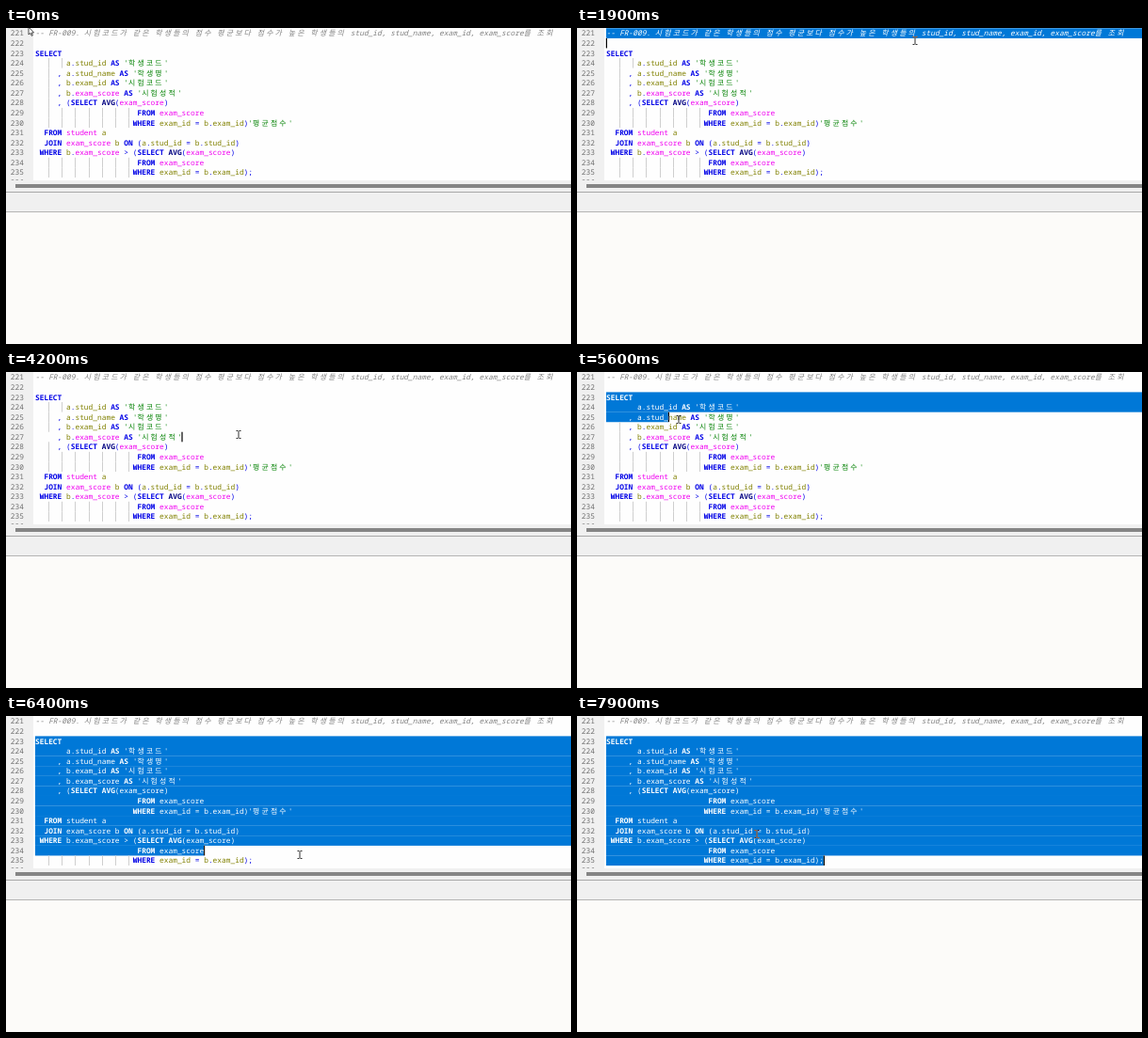
Recreate the animation shown at these times as an HTML page with a canvas. Size 600 by 336 pixels, loop 8 s.

```html
<!DOCTYPE html>
<html lang="ko">
<head>
<meta charset="utf-8">
<title>SQL editor</title>
<style>
html, body { margin: 0; width: 100%; height: 100%; overflow: hidden; background: #fcfbf9; }
canvas { display: block; }
</style>
</head>
<body>
<canvas id="stage" width="600" height="336"></canvas>
<script>
const LOOP = 8000, LEFT = 31, TOP = 0.25, CHAR = 4.715, ROW = 10.58, FIRST = 221;
const BLUE = '#0078d7', FAMILY = '7.86px "Noto Sans Mono", "Noto Sans CJK KR", "Noto Sans CJK", monospace';
const ctx = document.getElementById('stage').getContext('2d');

const lines = [
  '-- FR-009. 시험코드가 같은 학생들의 점수 평균보다 점수가 높은 학생들의 stud_id, stud_name, exam_id, exam_score를 조회',
  '',
  'SELECT',
  "       a.stud_id AS '학생코드'",
  "     , a.stud_name AS '학생명'",
  "     , b.exam_id AS '시험코드'",
  "     , b.exam_score AS '시험성적'",
  '     , (SELECT AVG(exam_score)',
  '                       FROM exam_score',
  "                      WHERE exam_id = b.exam_id)'평균점수'",
  '  FROM student a',
  '  JOIN exam_score b ON (a.stud_id = b.stud_id)',
  ' WHERE b.exam_score > (SELECT AVG(exam_score)',
  '                       FROM exam_score',
  '                      WHERE exam_id = b.exam_id);'
];

// [pattern, colour, font style]; the first match wins
const styles = [
  [/^--/, '#808080', 'italic '],
  [/^'/, '#008000', ''],
  [/^(SELECT|FROM|WHERE|JOIN|ON|AS)$/, '#0000e6', 'bold '],
  [/^AVG$/, '#000080', 'bold '],
  [/^(exam_score|student)$/, '#f000f0', ''],
  [/^\w/, '#808000', ''],
  [/./, '#0000e6', '']
];

// Each glyph takes one column, Hangul takes two
function layout(line) {
  const glyphs = [];
  let col = 0;
  for (const token of line.match(/--.*|'[^']*'|\w+|\s+|./g) || []) {
    const [, color, style] = styles.find(([pattern]) => pattern.test(token)) || styles[6];
    for (const ch of token) {
      if (ch !== ' ') glyphs.push({ ch, col, color, style });
      col += /[가-힣]/.test(ch) ? 2 : 1;
    }
  }
  return { glyphs, length: col, indent: line.search(/\S/) };
}
const rows = lines.map(layout);

// Pointer path: time, x, y
const path = [
  [0, 24, 0], [300, 24, 0], [800, 31, 5], [1000, 31, 5], [1750, 315, 13],
  [1900, 359, 13], [2150, 450, 9], [2550, 586, 6], [3650, 586, 6], [4100, 247, 66],
  [4600, 247, 66], [5150, 33, 27], [5400, 33, 27], [5600, 108, 50],
  [6400, 312, 147], [6700, 300, 153], [6950, 300, 153], [7500, 191, 125], [LOOP, 191, 125]
];
const drags = [[1000, 2600], [4140, 4140], [5300, 6720]];

function pointer(t) {
  const i = path.findIndex(p => p[0] > t);
  const [t0, x0, y0] = path[i - 1], [t1, x1, y1] = path[i];
  const k = (t - t0) / (t1 - t0);
  return { x: x0 + (x1 - x0) * k, y: y0 + (y1 - y0) * k };
}

function locate({ x, y }) {
  const row = Math.max(0, Math.min(rows.length - 1, Math.floor((y - TOP) / ROW)));
  const col = Math.max(0, Math.min(rows[row].length, Math.round((x - LEFT) / CHAR)));
  return { row, col };
}

function selection(t) {
  const drag = drags.filter(d => d[0] <= t).pop();
  if (!drag) return null;
  const [from, to] = drag;
  const blink = Math.floor(Math.max(0, t - to) / 530) % 2;
  // The selection trails the pointer slightly
  return { start: locate(pointer(from)), end: locate(pointer(Math.min(t, to) - 30)), caret: !blink };
}

function rect(color, x, y, w, h) {
  ctx.fillStyle = color;
  ctx.fillRect(x, y, w, h);
}

function text(ch, x, row, color, style = '') {
  ctx.font = style + FAMILY;
  ctx.fillStyle = color;
  ctx.fillText(ch, x, TOP + row * ROW + 8.1);
}

function drawRow({ glyphs, length, indent }, r, sel) {
  const top = TOP + r * ROW;
  let from = 0, to = 0;
  if (sel && r >= sel.start.row && r <= sel.end.row) {
    from = r === sel.start.row ? sel.start.col : 0;
    to = r === sel.end.row ? sel.end.col : Infinity;
    rect(BLUE, LEFT + from * CHAR, top, Math.min(600, (to - from) * CHAR), ROW + 0.1);
  }
  for (let c = 3; c < indent; c += 3)
    if (c >= to) rect('#cfcfcf', Math.round(LEFT + c * CHAR), top, 1, ROW);
  for (const g of glyphs) {
    const chosen = g.col >= from && g.col < to;
    text(g.ch, LEFT + g.col * CHAR, r, chosen ? '#fff' : g.color, g.style);
  }
}

function drawPointer({ x, y }) {
  if (x < 29) {
    ctx.beginPath();
    [[0, -1], [0, 7], [1.9, 5.4], [3.2, 8.3], [4.4, 7.8], [3.2, 5], [5.6, 5]]
      .forEach(([dx, dy]) => ctx.lineTo(x + dx, y + dy));
    ctx.closePath();
    ctx.fillStyle = '#fff';
    ctx.strokeStyle = '#222';
    ctx.lineWidth = 0.8;
    ctx.fill();
    ctx.stroke();
    return;
  }
  x = Math.round(x);
  y = Math.round(y);
  const ink = '#d0d0d0';
  rect(ink, x - 0.5, y - 3, 1, 7);
  for (const edge of [y - 4, y + 4]) {
    rect(ink, x - 2.5, edge, 2, 1);
    rect(ink, x + 0.5, edge, 2, 1);
  }
}

function draw(t) {
  const sel = selection(t), mouse = pointer(t);
  rect('#fefefe', 0, 0, 600, 162);
  rect('#f0f0f0', 0, 0, 29, 162);

  ctx.save();
  ctx.beginPath();
  ctx.rect(0, 0, 600, 162);
  ctx.clip();
  for (let r = 0; r <= rows.length; r++)
    [...String(FIRST + r)].forEach((d, i) => text(d, 4.8 + i * CHAR, r, '#707070'));
  rows.forEach((row, r) => drawRow(row, r, sel));
  ctx.restore();

  rect('#f0f0f0', 0, 162, 600, 33);
  rect('#858585', 10, 166, 590, 4);
  rect('#a8a8a8', 0, 174, 600, 1);
  rect('#b4b4b4', 0, 195, 600, 1);
  rect('#fcfbf9', 0, 196, 600, 140);

  // Caret and text pointer invert what lies beneath
  if (mouse.x >= 29) ctx.globalCompositeOperation = 'difference';
  if (sel && sel.caret)
    rect('#fff', LEFT + sel.end.col * CHAR - 0.2, TOP + sel.end.row * ROW, 1.2, ROW);
  drawPointer(mouse);
  ctx.globalCompositeOperation = 'source-over';
}

ctx.textRendering = 'geometricPrecision';
function frame() {
  draw(performance.now() % LOOP);
  requestAnimationFrame(frame);
}
frame();
</script>
</body>
</html>
```
